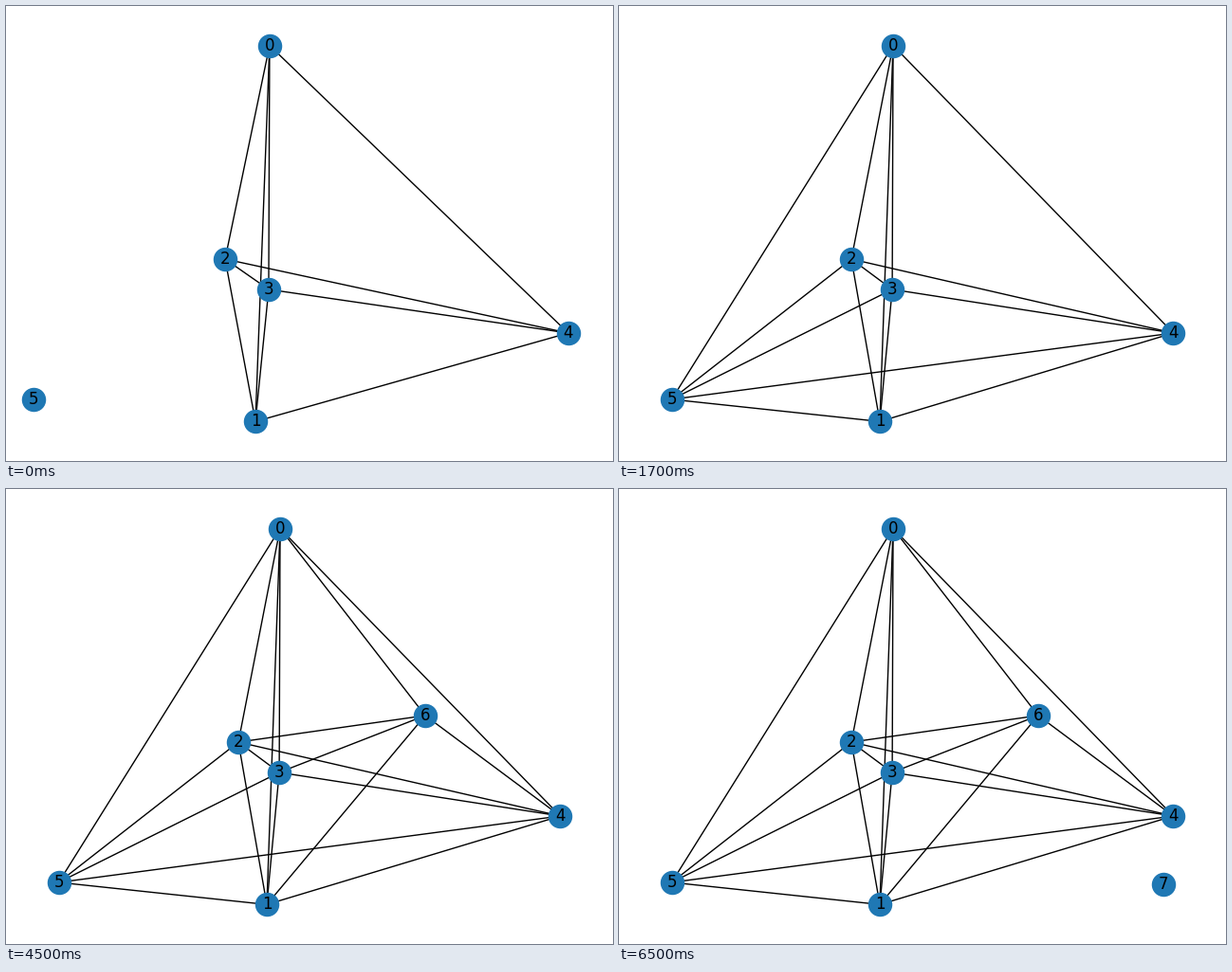
A matplotlib script that plays this animation: 640x480 px, repeating every 8 s.

```python
from itertools import combinations

import matplotlib.pyplot as plt
import numpy as np
from matplotlib.animation import FuncAnimation
from matplotlib.collections import LineCollection

WIDTH, HEIGHT, DPI = 640, 480, 100
STEP_MS, LOOP_MS = 500, 8000
STAGE_STARTS = [500, 2500, 4500, 6500]

NODES = np.array([
    (289.0, 41.65), (275.0, 438.35), (245.0, 267.0), (288.1, 299.0),
    (584.46, 345.0), (55.54, 415.0), (442.0, 239.0), (574.0, 417.0),
])
CORE = list(combinations(range(5), 2))


def links_to_core(node):
    return [(i, node) for i in range(5)]


WITH_FIVE = CORE + links_to_core(5)
WITH_SIX = WITH_FIVE + links_to_core(6)

# Each stage: number of visible nodes and the edges between them.
STAGES = [(6, CORE), (6, WITH_FIVE), (7, WITH_FIVE), (7, WITH_SIX), (8, WITH_SIX)]


def view_limits(nodes, edges):
    """Fit all nodes, with extra padding around the connected ones."""
    linked = NODES[np.unique(edges)]
    low, high = linked.min(axis=0), linked.max(axis=0)
    pad = 0.05 * (high - low)
    low = np.minimum(low - pad, nodes.min(axis=0))
    high = np.maximum(high + pad, nodes.max(axis=0))
    margin = 0.05 * (high - low)
    return low - margin, high + margin


fig = plt.figure(figsize=(WIDTH / DPI, HEIGHT / DPI), dpi=DPI, facecolor="white")
ax = fig.add_axes((0, 0, 1, 1))


def draw(frame):
    stage = sum(frame * STEP_MS >= start for start in STAGE_STARTS)
    count, edges = STAGES[stage]
    nodes = NODES[:count]

    ax.clear()
    ax.set_axis_off()
    ax.add_collection(LineCollection(
        [NODES[list(edge)] for edge in edges],
        colors="black", linewidths=1.0, zorder=1))
    ax.scatter(*nodes.T, s=300, c="#1f78b4", zorder=2)
    for label, (x, y) in enumerate(nodes):
        ax.text(x, y, str(label), size=12, color="black",
                family="DejaVu Sans", ha="center", va="center", zorder=3)

    low, high = view_limits(nodes, edges)
    ax.set_xlim(low[0], high[0])
    ax.set_ylim(high[1], low[1])
    return []


anim = FuncAnimation(fig, draw, frames=LOOP_MS // STEP_MS, interval=STEP_MS,
                     init_func=lambda: [], repeat=True, repeat_delay=0)
plt.show()
```
